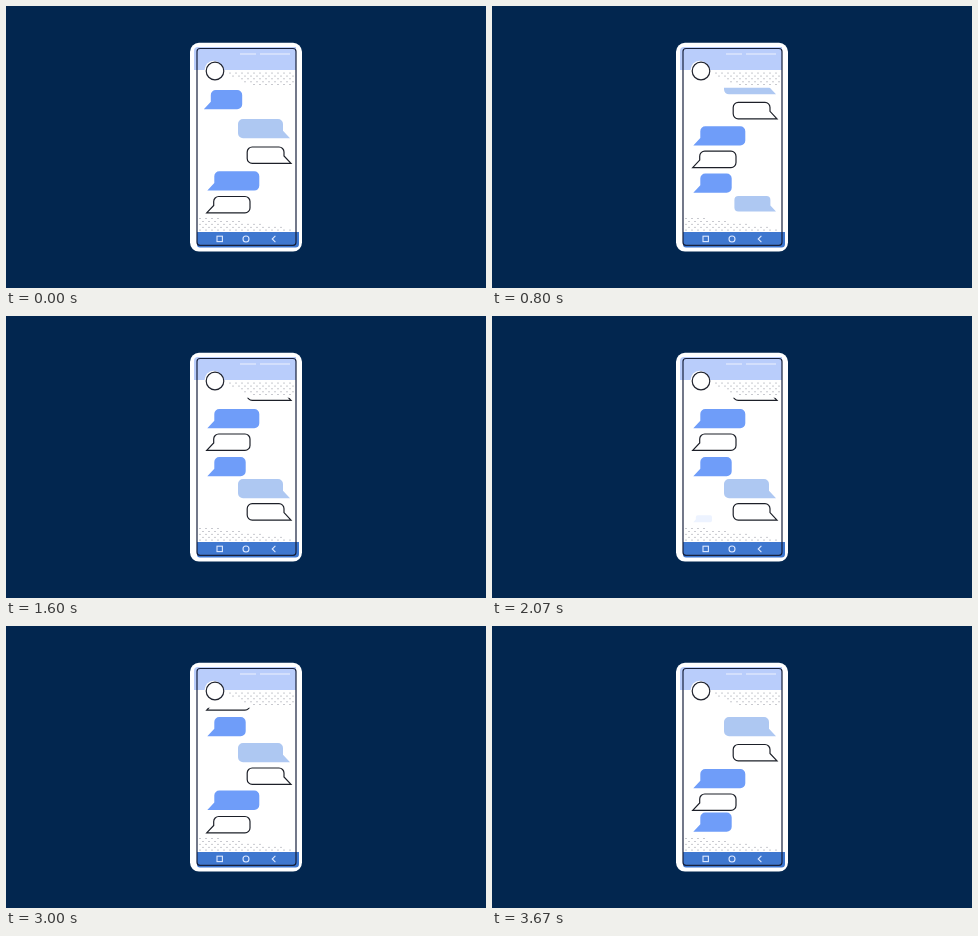
Write an HTML page that moves like this. It is 480 by 282 pixels and loops after 3.99 s.

```html
<!DOCTYPE html>
<html lang="en">
<head>
<meta charset="utf-8">
<title>Chat on a phone</title>
<style>
  html, body { margin: 0; width: 100%; height: 100%; overflow: hidden; background: #02264f; }
  svg { display: block; width: 100%; height: 100%; }
</style>
</head>
<body>
<svg id="stage" viewBox="0 0 480 282">
  <defs><clipPath id="screen"><rect x="188" y="81.8" width="104" height="144"/></clipPath></defs>
  <rect width="480" height="282" fill="#02264f"/>
  <rect x="184" y="36.8" width="112" height="208.8" rx="9" fill="#fff"/>
  <path d="M188 64V45q0-4 4-4H290V64Z" fill="#b9cdfb"/>
  <path d="M191 226H293V238q0 3.5-3.5 3.5H194q-3 0-3-3Z" fill="#3e77cf"/>
  <path d="M234 48h16M254 48h30" stroke="#dce6fd" stroke-width="1.4"/>
  <g id="dots" fill="#6d7180"></g>
  <g id="chat" clip-path="url(#screen)"></g>
  <rect x="191" y="42.5" width="99" height="196.8" rx="3" fill="none" stroke="#17213c" stroke-width="1.2"/>
  <circle cx="207.6" cy="63.8" r="9" fill="#fff"/>
  <circle cx="209" cy="65" r="8.8" fill="#fff" stroke="#20232e" stroke-width="1.2"/>
  <g fill="none" stroke="#dce8ff" stroke-width="1.1">
    <rect x="211" y="230.2" width="5.4" height="5.4"/>
    <circle cx="240" cy="233" r="3"/>
    <path d="M269.4 229.8L266.2 233L269.4 236.2"/>
  </g>
</svg>
<script>
const LOOP = 3990, FRAMES = 60;
const NS = 'http://www.w3.org/2000/svg';
const $ = id => document.getElementById(id);

function add(parent, tag, attrs) {
  const el = document.createElementNS(NS, tag);
  for (const k in attrs) el.setAttribute(k, attrs[k]);
  return parent.appendChild(el);
}

// Halftone triangles below the header and above the footer
for (let r = 0; r < 5; r++) {
  const shift = r % 2 * 3;
  for (let x = 194 + shift; x < 289; x += 6) {
    if (x > 219 + r * 6) add($('dots'), 'circle', { cx: x, cy: 67 + r * 2.9, r: .5 });
    if (x < 216 + r * 20) add($('dots'), 'circle', { cx: x, cy: 212.5 + r * 2.9, r: .5 });
  }
}

// Local origin is the tail tip; dir -1 mirrors the bubble
function bubblePath(w, h, dir) {
  const r = 5, X = x => x * dir, turn = dir > 0 ? 1 : 0;
  const arc = (x, y) => `a${r} ${r} 0 0 ${turn} ${X(x)} ${y}`;
  return `M0 0L${X(7)} -7.5V${r - h}${arc(r, -r)}H${X(w - r)}${arc(r, r)}V${-r}${arc(-r, r)}Z`;
}

const line = { fill: '#fff', stroke: '#1d2029', 'stroke-width': 1.2 };
const KINDS = {
  A: { x: 201.3, w: 38.4, h: 19.3, dir: 1, style: { fill: '#6f9df9' } },
  B: { x: 284, w: 52, h: 19.3, dir: -1, style: { fill: '#aec8f2' } },
  C: { x: 285, w: 43.8, h: 16.4, dir: -1, style: line },
  D: { x: 201.3, w: 52, h: 19.3, dir: 1, style: { fill: '#6f9df9' } },
  E: { x: 200.7, w: 43.3, h: 16.4, dir: 1, style: line }
};

// Scroll and pop-in windows, in frames
const MOVES = [[0, 6], [9, 13], [20, 23], [31, 36], [40, 45], [50, 55]];
const POPS = [[0, 6], [9, 13], [20, 23], [30, 35], [40, 45], [50, 55]];

// ys: top edge before and after each scroll, beginning with scroll number "from"
const bubbles = [
  { kind: 'A', from: 0, ys: [84, 61], dx: -3.5 },
  { kind: 'B', from: 0, ys: [113, 91, 65, 41] },
  { kind: 'C', from: 0, ys: [141, 118.5, 92.3, 68, 44] },
  { kind: 'D', from: 0, ys: [165.3, 143, 116, 93, 68.7, 44] },
  { kind: 'E', from: 0, ys: [190.5, 168, 141, 118, 94, 67.7, 43] },
  { kind: 'A', from: 0, ys: [186.5, 186.5, 164, 141, 117, 91, 61], pop: 0, drift: -3.5 },
  { kind: 'B', from: 1, ys: [187, 186, 163, 140.5, 117, 91], pop: 1 },
  { kind: 'C', from: 2, ys: [190, 187.7, 167.5, 142, 118.5], pop: 2 },
  { kind: 'D', from: 3, ys: [187, 187, 164.6, 143], pop: 3 },
  { kind: 'E', from: 4, ys: [190.5, 190.5, 168], pop: 4 },
  { kind: 'A', from: 5, ys: [186.5, 186.5], pop: 5 }
];

for (const b of bubbles) {
  const k = KINDS[b.kind];
  b.el = add($('chat'), 'path', { d: bubblePath(k.w, k.h, k.dir), ...k.style });
}

const progress = (f, [a, b]) => Math.min(1, Math.max(0, (f - a) / (b - a)));
const ease = p => p * p * (3 - 2 * p);

function draw(f) {
  const scroll = MOVES.map(m => ease(progress(f, m)));
  for (const b of bubbles) {
    const k = KINDS[b.kind];
    let y = b.ys[0];
    for (let i = 1; i < b.ys.length; i++) y += (b.ys[i] - b.ys[i - 1]) * scroll[b.from + i - 1];
    const x = k.x + (b.dx || 0) + (b.drift || 0) * scroll[5];
    const p = b.pop === undefined ? 1 : progress(f, POPS[b.pop]);
    b.el.setAttribute('transform', `translate(${x} ${y + k.h}) scale(${.2 + .8 * p})`);
    b.el.setAttribute('opacity', Math.min(1, Math.max(0, 1.6 * p - .2)));
  }
}

const start = performance.now();
function tick() {
  const t = (performance.now() - start) % LOOP;
  draw(Math.floor(t * FRAMES / LOOP));
  requestAnimationFrame(tick);
}
tick();
</script>
</body>
</html>
```
